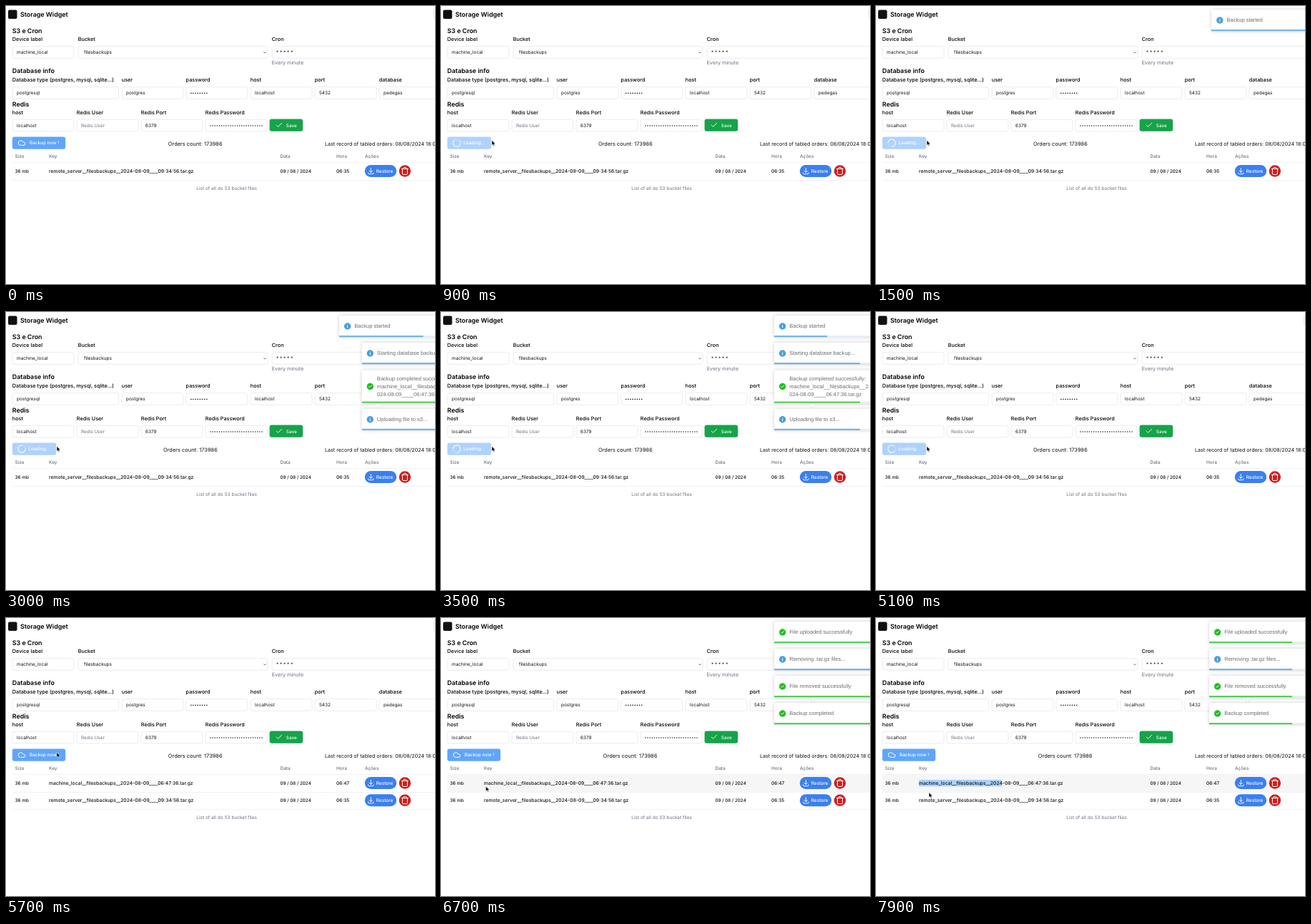
These frames come from a looping animation (600x390 px, 8000 ms). An HTML page:

```html
<!DOCTYPE html>
<html lang="en">
<head>
<meta charset="utf-8">
<title>Backup panel</title>
<style>
  html, body { margin: 0; width: 100%; height: 100%; overflow: hidden; background: #fff; }
  svg { display: block; width: 600px; height: 390px; }
  text { font-family: Inter, "Open Sans", sans-serif; text-rendering: geometricPrecision; white-space: pre; }
  .toast text { font-family: "Liberation Sans", Arial, sans-serif; }
  .toast .card { fill: #fff; filter: drop-shadow(0 .5px 2.5px rgba(0, 0, 0, .2)); }
  .bar { transform-box: fill-box; transform-origin: 0 0; }
  .spin { transform-box: fill-box; transform-origin: 50% 50%; }
</style>
</head>
<body>
<svg id="stage" viewBox="0 0 600 390"></svg>
<script>
const LOOP = 8000;
const stage = document.getElementById('stage');

function add(parent, tag, attrs = {}, content) {
  const el = document.createElementNS('http://www.w3.org/2000/svg', tag);
  for (const key in attrs) el.setAttribute(key, attrs[key]);
  if (content !== undefined) el.textContent = content;
  parent.appendChild(el);
  return el;
}
const group = (parent, attrs) => add(parent, 'g', attrs);
const rect = (parent, x, y, width, height, fill, rx = 0, more = {}) =>
  add(parent, 'rect', { x, y, width, height, fill, rx, ...more });
const text = (parent, x, y, str, size = 6.45, weight = 400, fill = '#111') =>
  add(parent, 'text', { x, y, 'font-size': size, 'font-weight': weight, fill }, str);
const icon = (parent, x, y, scale, d, stroke = '#fff', width = 2) =>
  add(parent, 'path', {
    d, stroke, fill: 'none', 'stroke-width': width, 'stroke-linecap': 'round',
    'stroke-linejoin': 'round', transform: `translate(${x} ${y}) scale(${scale})`
  });

// steps: [ms, value, easing to the next step]
function play(el, prop, steps, easing = 'linear') {
  const all = [...steps];
  if (all[0][0] > 0) all.unshift([0, all[0][1]]);
  const last = all[all.length - 1];
  if (last[0] < LOOP) all.push([LOOP, last[1]]);
  const frames = all.map(([ms, value, ease]) => ({
    offset: ms / LOOP, [prop]: value, easing: ease || easing
  }));
  el.animate(frames, { duration: LOOP, iterations: Infinity });
}
const show = (el, steps) => play(el, 'opacity', steps, 'step-end');

// Form
function field(x, y, width, value, color) {
  rect(stage, x + .3, y + .3, width - .6, 16.6, '#fff', 2.6, { stroke: '#e1e4e8', 'stroke-width': .7 });
  if (value) text(stage, x + 6.2, y + 10.8, value, 6.45, 400, color);
}
const heading = (y, str) => text(stage, 8.8, y, str, 8.85, 600, '#000');
const label = (x, y, str) => text(stage, x, y, str, 7.25, 500, '#000');
function dots(x, y, count) {
  for (let i = 0; i < count; i++) add(stage, 'circle', { cx: x + i * 3.13, cy: y, r: .8, fill: '#222' });
}

rect(stage, 3, 5.5, 12.5, 12.5, '#111', 2);
text(stage, 20, 15.2, 'Storage Widget', 8.9, 600, '#000');
rect(stage, 598.5, 4.5, 20, 14.5, '#fff', 2.5, { stroke: '#d9dce1', 'stroke-width': .8 });

heading(37.5, 'S3 e Cron');
label(8.8, 49.2, 'Device label');
label(100.8, 49.2, 'Bucket');
label(371.8, 49.2, 'Cron');
field(8.8, 56.3, 86.5, 'machine_local');
field(100.8, 56.3, 265.5);
text(stage, 109, 67.1, 'filesbackups', 6.5);
icon(stage, 359.8, 63.2, .18, 'M4 8l8 8 8-8', '#444', 4);
field(371.8, 56.3, 240, '* * * * *');
text(stage, 371.8, 81.6, 'Every minute', 7.2, 400, '#6b7280');

heading(94.4, 'Database info');
[
  [8.8, 149, 'Database type (postgres, mysql, sqlite...)', 'postgresql'],
  [161.8, 86.5, 'user', 'postgres'],
  [251.6, 86.5, 'password', ''],
  [341.8, 86.5, 'host', 'localhost'],
  [431.8, 86.5, 'port', '5432'],
  [521.8, 86.5, 'database', 'pedegas']
].forEach(([x, width, name, value]) => {
  label(x, 105.9, name);
  field(x, 113.3, width, value);
});
dots(258.8, 122.4, 8);

heading(140.6, 'Redis');
[
  [8.8, 'host', 'localhost'],
  [98.8, 'Redis User', 'Redis User', '#6b7280'],
  [188.8, 'Redis Port', '6379'],
  [278.8, 'Redis Password', '']
].forEach(([x, name, value, color]) => {
  label(x, 151.6, name);
  field(x, 159, 86.5, value, color);
});
dots(286, 168, 24);

rect(stage, 368.6, 158.5, 46.6, 17.3, '#16a34a', 3);
icon(stage, 376.4, 161.5, .46, 'M20 6 9 17l-5-5');
text(stage, 391.8, 169.5, 'Save', 6.35, 500, '#fff');

// Backup button, idle and busy
const idle = group(stage);
rect(idle, 8.8, 183.6, 74.4, 17.2, '#60a5fa', 3);
icon(idle, 16.3, 186.3, .48, 'M17.5 19H9a7 7 0 1 1 6.71-9h1.79a4.5 4.5 0 1 1 0 9Z');
text(idle, 33, 194.4, 'Backup now !', 6.4, 500, '#fff');
text(idle, 226.8, 195.6, 'Orders count: 173986', 7.45);
show(idle, [[0, 1], [900, 0], [5300, 1]]);

const busy = group(stage);
rect(busy, 8.8, 183.6, 61.4, 17.2, '#afd2fc', 3);
const spinner = group(busy, { class: 'spin' });
const ring = { cx: 22, cy: 192.1, r: 5.2, fill: 'none', stroke: '#fff', 'stroke-width': 1.3 };
add(spinner, 'circle', { ...ring, 'stroke-opacity': .25 });
add(spinner, 'circle', { ...ring, 'stroke-opacity': .7, 'stroke-dasharray': '24 40' });
spinner.animate([{ transform: 'rotate(0deg)' }, { transform: 'rotate(360deg)' }],
  { duration: 1000, iterations: Infinity });
text(busy, 31.3, 194.4, 'Loading...', 6.45, 500, '#fff');
text(busy, 220, 195.6, 'Orders count: 173986', 7.45);
show(busy, [[0, 0], [900, 1], [5300, 0]]);

text(stage, 446, 195.6, 'Last record of tabled orders: 08/08/2024 18:01', 7.17);

// File table
const line = (parent, y) => rect(parent, 8.8, y, 600, .6, '#e8eaee');
[[12.5, 'Size'], [60, 'Key'], [383.5, 'Data'], [462, 'Hora'], [502, 'Ações']]
  .forEach(([x, name]) => text(stage, x, 212.6, name, 6.45, 500, '#6b7280'));
line(stage, 219.4);

function row(parent, key, hour) {
  text(parent, 12.5, 233.9, '36 mb', 6.45, 500);
  text(parent, 60, 233.9, key, 6.76, 500);
  text(parent, 383.5, 233.9, '09 / 08 / 2024', 6.3, 500);
  text(parent, 462, 233.9, hour, 6.5, 500);
  rect(parent, 501.8, 223, 44.4, 17, '#3b7ff0', 8.5);
  icon(parent, 504.8, 226, .46,
    'M4 17v2a2 2 0 0 0 2 2h12a2 2 0 0 0 2-2v-2M7 11l5 5 5-5M12 3v13');
  text(parent, 517.7, 233.9, 'Restore', 6.5, 500, '#fff');
  add(parent, 'circle', { cx: 557.9, cy: 231.5, r: 8.2, fill: '#cc1f1f' });
  icon(parent, 551.9, 225.4, .5,
    'M3 6h18M19 6v14a2 2 0 0 1-2 2H7a2 2 0 0 1-2-2V6M8 6V4a2 2 0 0 1 2-2h4a2 2 0 0 1 2 2v2');
  line(parent, 244);
}

const fresh = group(stage);
const hover = rect(fresh, 8.8, 220, 600, 24, '#f6f6f7');
const selection = rect(fresh, 60, 226.9, 116, 9.4, '#a9d3fb', 0, { class: 'bar' });
row(fresh, 'machine_local__filesbackups__2024-08-09____06:47:36.tar.gz', '06:47');
show(fresh, [[0, 0], [5300, 1]]);
show(hover, [[0, 0], [6450, 1]]);
play(selection, 'transform', [[7000, 'scaleX(0)', 'ease-in-out'], [7500, 'scaleX(1)']]);

const older = group(stage);
row(older, 'remote_server__filesbackups__2024-08-09____09:34:56.tar.gz', '06:35');
text(older, 266.3, 258.3, 'List of all do S3 bucket files', 6.5, 400, '#6b7280');
play(older, 'transform', [[0, 'translate(0px, 0px)'], [5300, 'translate(0px, 24.2px)']], 'step-end');

// Toasts
const OUT = 'cubic-bezier(.215,.61,.355,1)';
const shift = x => `translate(${x}px, 0px)`;

function toast({ y, lines, ok, enter, exit, progress, height = 30.2 }) {
  const outer = group(stage, { class: 'toast' });
  const el = group(outer);
  const color = ok ? '#1fbf24' : '#469fdc';
  const mid = y + (height - .6) / 2;
  rect(el, 466, y, 151, height, '#fff', 1.9, { class: 'card' });
  add(el, 'circle', { cx: 477.6, cy: mid + .2, r: 4.7, fill: color });
  if (ok) icon(el, 474.6, mid - 2.8, .25, 'M20 6 9 17l-5-5', '#fff', 3.6);
  else icon(el, 474.6, mid - 2.8, .25, 'M12 4v.5M12 10v10', '#fff', 4);
  lines.forEach((str, i) =>
    text(el, 487.2, mid + 2.6 + (i - (lines.length - 1) / 2) * 11.3, str, 7.55, 400, '#6c6c6c'));
  const bar = { y: y + height - 2.1, height: 2.1, x: 466, width: 151, fill: color };
  add(el, 'rect', { ...bar, opacity: .15 });
  play(add(el, 'rect', { ...bar, class: 'bar', opacity: .75 }), 'transform',
    progress.map(([ms, left]) => [ms, `scaleX(${left})`]));

  const path = [
    [enter, shift(1410), OUT], [enter + 420, shift(-11.8), OUT], [enter + 525, shift(4.7), OUT],
    [enter + 630, shift(-2.4), OUT], [enter + 700, shift(0)]
  ];
  if (exit) path.push([exit, shift(0), 'ease'], [exit + 50, shift(-9.4), 'ease'], [exit + 240, shift(945)]);
  play(el, 'transform', path);
  return outer;
}

toast({
  y: 5, lines: ['Backup started'], enter: 1022, exit: 4350,
  progress: [[1722, 1], [3000, .78], [4200, .09], [4350, 0]]
});
[
  { y: 43, lines: ['Starting database backup...'] },
  {
    y: 81.5, height: 46.2, ok: true,
    lines: ['Backup completed successfully:', 'machine_local__filesbackups__2', '024-08-09____06:47:36.tar.gz']
  },
  { y: 135.7, lines: ['Uploading file to s3...'] }
].forEach(item => {
  const el = toast({ ...item, enter: 2698, exit: 4700, progress: [[3200, 1], [4200, .32], [4670, 0]] });
  play(el, 'transform', [[4590, 'translate(0px, 0px)', 'ease'], [4700, 'translate(0px, -38px)']]);
});
[
  ['File uploaded successfully', true],
  ['Removing .tar.gz files...', false],
  ['File removed successfully', true],
  ['Backup completed', true]
].forEach(([str, ok], i) => toast({
  y: 5 + 38 * i, lines: [str], ok, enter: 5960, progress: [[6680, 1], [7900, .77], [8000, .75]]
}));

// Pointer
const pointer = add(stage, 'path', {
  d: 'M0 0V7.2L1.7 5.7 2.8 8.3 4 7.8 2.9 5.3H5.2Z',
  fill: '#000', stroke: '#fff', 'stroke-width': .6, 'stroke-linejoin': 'round'
});
play(pointer, 'transform', [
  [150, 190, -14], [700, 71, 188.3], [5900, 71, 188.3], [6300, 72, 212], [6650, 62.6, 236],
  [6800, 62.6, 236], [7000, 60, 233], [7500, 176, 233], [7850, 74, 244.6]
].map(([ms, x, y]) => [ms, `translate(${x}px, ${y}px)`, 'ease-in-out']));
</script>
</body>
</html>
```
